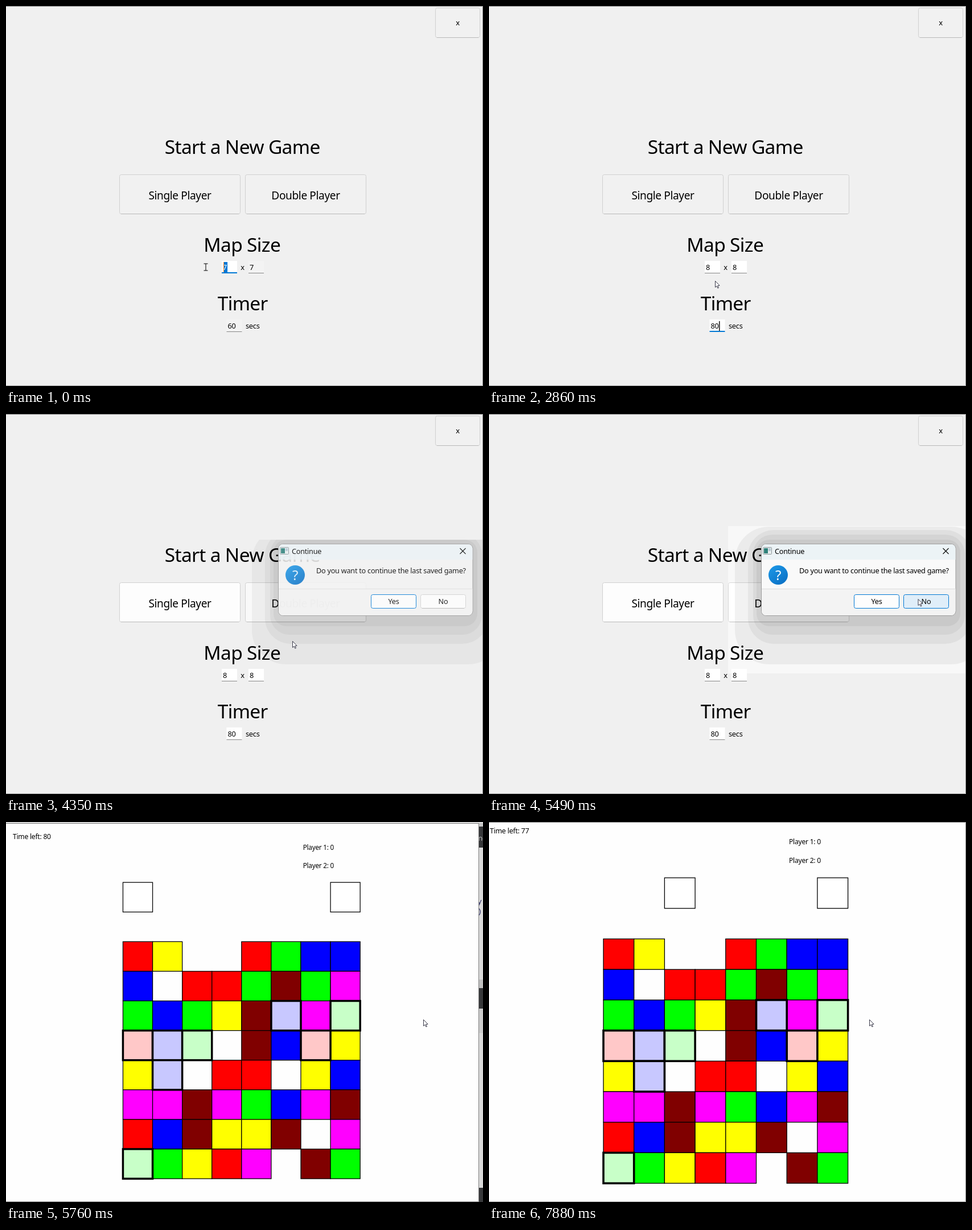
These frames come from a looping animation (838 px wide and 668 px high, 8000 ms). An HTML page with a canvas:

```html
<!DOCTYPE html>
<html lang="en">
<head>
<meta charset="utf-8">
<title>Start a New Game</title>
<style>
  html, body { margin: 0; width: 100%; height: 100%; overflow: hidden; background: #f0f0f0; }
  canvas { display: block; }
</style>
</head>
<body>
<canvas id="stage" width="838" height="668"></canvas>
<script>
const g = document.getElementById('stage').getContext('2d');
const LOOP = 8000;
const SANS = '"Noto Sans", "Open Sans", sans-serif';
const MONO = '"Liberation Mono", "DejaVu Sans Mono", monospace';
const BLUE = '#0078d4';

// Step tables: [start time, ...values]; gives the values of the last row already begun.
const at = (table, t) => table.filter(row => row[0] <= t).pop().slice(1);

const I = 1, ARROW = 0;
const POINTER = [
  [0, 351, 459, I], [290, 350, 458, ARROW], [420, 362, 463, ARROW], [560, 392, 466, I],
  [690, 425, 466, I], [830, 446, 464, I], [970, 449, 462, I], [1110, 446, 460, I],
  [1260, 430, 459, I], [1390, 415, 459, I], [1650, 410, 505, ARROW], [1780, 409, 558, I],
  [1910, 406, 564, I], [2030, 385, 566, I], [2150, 360, 568, I], [2280, 343, 569, I],
  [2580, 346, 558, ARROW], [2720, 372, 524, ARROW], [2860, 397, 483, ARROW],
  [3000, 398, 425, ARROW], [3140, 388, 356, ARROW], [3280, 402, 342, ARROW],
  [3420, 432, 337, ARROW], [3560, 468, 338, ARROW], [3830, 474, 348, ARROW],
  [3960, 490, 375, ARROW], [4110, 503, 399, ARROW], [4490, 525, 402, ARROW],
  [4620, 560, 398, ARROW], [4770, 610, 385, ARROW], [4920, 665, 365, ARROW],
  [5070, 715, 343, ARROW], [5190, 745, 329, ARROW], [5340, 753.5, 325, ARROW],
  [5760, 733, 347, ARROW], [5910, 710, 380, ARROW], [6040, 688, 401, ARROW],
  [6320, 681, 401, ARROW], [6590, 678, 380, ARROW], [6730, 672, 356, ARROW],
  [6900, 668, 347, ARROW]
];

const PLAIN = 0, WHITE = 1, CARET = 2, SELECTED = 3;
const COLS = [[0, '7', SELECTED], [150, '8', CARET], [1110, '8', WHITE]];
const ROWS = [[0, '7', PLAIN], [1110, '7', CARET], [1260, '7', SELECTED], [1520, '8', CARET], [1910, '8', WHITE]];
const SECS = [[0, '60', PLAIN], [1910, '60', CARET], [2030, '60', SELECTED],
  [2580, '8', CARET], [2720, '80', CARET], [3680, '80', WHITE]];

const GREY = '#d0d0d0';
const SINGLE = [[0, '#f1f1f1', GREY], [3140, '#e0eef9', BLUE], [3420, '#fdfdfd', GREY], [5610, '#f1f1f1', GREY]];
const DOUBLE = [[0, '#f1f1f1', GREY], [3420, '#e0eef9', BLUE], [3680, '#d5e8f6', BLUE],
  [4240, '#f9f9f9', GREY], [5610, '#f1f1f1', GREY]];

function rect(x, y, w, h, fill) {
  g.fillStyle = fill;
  g.fillRect(x, y, w, h);
}

function box(x, y, w, h, r, fill, stroke) {
  g.beginPath();
  g.roundRect(x, y, w, h, r);
  if (fill) { g.fillStyle = fill; g.fill(); }
  if (stroke) { g.strokeStyle = stroke; g.lineWidth = 1; g.stroke(); }
}

function line(points, color, width = 1) {
  g.beginPath();
  points.forEach(([x, y]) => g.lineTo(x, y));
  g.strokeStyle = color;
  g.lineWidth = width;
  g.stroke();
}

// y is the middle of the capitals
function text(s, x, y, size, { align = 'left', color = '#000', font = SANS, weight = 400 } = {}) {
  g.font = `${weight} ${size}px ${font}`;
  g.letterSpacing = font === SANS ? `${-0.02 * size}px` : '0px';
  g.textAlign = align;
  g.fillStyle = color;
  g.fillText(s, x, y + 0.36 * size);
}

function button(x, y, w, h, label, size, [fill, stroke]) {
  box(x + .5, y + .5, w - 1, h - 1, 3, fill, stroke);
  if (stroke === GREY) line([[x + 3, y + h - .5], [x + w - 3, y + h - .5]], '#b9b9b9');
  text(label, x + w / 2, y + h / 2 + (size > 15 ? 2 : 0), size, { align: 'center' });
}

function field(x, y, [value, state]) {
  const focus = state >= CARET;
  rect(x, y, 27, 22, state === PLAIN ? '#f3f3f3' : '#fff');
  rect(x, y + (focus ? 20 : 21), 27, focus ? 2 : 1, focus ? BLUE : '#868686');
  text(value, x + 2, y + 11.5, 12.8);
  const w = g.measureText(value).width;
  if (state === SELECTED) {
    rect(x + 3, y + 2, w, 18, '#0078d7');
    text(value, x + 2, y + 11.5, 12.8, { color: '#fff' });
    rect(x + 3, y + 2, 1, 18, '#ff8728');
  }
  if (state === CARET) rect(x + 2.5 + w, y + 3, 1.4, 17, '#000');
}

function frame() {
  rect(0, 0, 838, 1, '#7a7a7a');
  rect(837, 0, 1, 668, '#8a8a8a');
  rect(0, 667, 838, 1, '#a0a0a0');
}

function menu(t) {
  rect(-10, -10, 860, 690, '#f0f0f0');
  button(754, 3, 79, 53, 'x', 13, ['#f1f1f1', GREY]);
  const mid = { align: 'center' };
  text('Start a New Game', 415.2, 247.5, 33.5, mid);
  button(199, 296, 213, 70, 'Single Player', 19.1, at(SINGLE, t));
  button(420, 296, 213, 70, 'Double Player', 19.1, at(DOUBLE, t));
  text('Map Size', 414.7, 420, 33.5, mid);
  field(379, 448, at(COLS, t));
  text('x', 415.5, 459.5, 12.8, mid);
  field(426, 448, at(ROWS, t));
  text('Timer', 415.7, 523, 33.5, mid);
  field(387.5, 551, at(SECS, t));
  text('secs', 421, 562.5, 12.8);
}

function shadow(strength) {
  const rings = [[432, 198, 440, 242, 60], [455, 204, 392, 200, 45], [464, 212, 372, 176, 34], [470, 221, 358, 152, 22]];
  rings.forEach(([x, y, w, h, r]) => box(x, y, w, h, r, `rgba(0,0,0,${0.05 * strength})`));
}

function dialog(t) {
  const closing = t >= 5610;
  box(478.5, 228.5, 341.5, 126, 8, '#f9f9f9', '#9c9c9c');
  box(479, 229, 340.5, 27, [8, 8, 0, 0], '#ecf3f6');
  box(479, 307, 340.5, 47, [0, 0, 8, 8], '#f3f3f3');
  rect(479, 307, 340.5, 1, '#dedede');
  box(481.5, 234.5, 15, 12, 1, '#e8eeee', '#8a9498');
  rect(483, 236, 7, 9, '#2d8079');
  rect(491, 236, 4, 5, '#b9cbd8');
  text('Continue', 502, 241, 12.7);
  line([[797.5, 236], [807.5, 246]], '#111', 1.2);
  line([[807.5, 236], [797.5, 246]], '#111', 1.2);
  const blue = g.createLinearGradient(495, 267, 520, 300);
  blue.addColorStop(0, '#1c97e6');
  blue.addColorStop(1, '#0a6fc4');
  g.beginPath();
  g.arc(508, 283, 17, 0, 7);
  g.fillStyle = blue;
  g.fill();
  text('?', 508, 283.5, 24, { align: 'center', color: '#fff', weight: 500 });
  text('Do you want to continue the last saved game?', 545, 275, 12.7);
  const over = t >= 5190;
  button(641, 317, 80, 25, 'Yes', 12.7, ['#fdfdfd', closing ? GREY : BLUE]);
  button(728, 317, 80, 25, 'No', 12.7, closing ? ['#d3e8f8', BLUE] : over ? ['#e0eef9', BLUE] : ['#fdfdfd', GREY]);
}

const CODE = [
  'void QFlagScene::keyPressEvent(QKeyEvent *event) {',
  '    if (event->key() == Qt::Key_P) {',
  '        emit pauseGame();',
  '    } else if (event->key() == Qt::Key_O) {',
  '        emit saveGame();',
  '    } else if (event->key() == Qt::Key_Left || event->key()',
  '               event->key() == Qt::Key_Up || event->key()',
  '        emit movePlayer1(event->key());',
  '    } else if (event->key() == Qt::Key_W || event->key()',
  '        emit movePlayer2(event->key());',
  '    }else if (event->key() == Qt::Key_Q) {',
  '        emit quitGame();',
  '    }',
  '}'
];
const TREE = ['Map.h', 'Player.h', 'PlayerSignals.h', 'QFlagScene.h', 'SaveManager.h', '+Sources', 'Game.cpp',
  'GameMenu.cpp', 'Grid.cpp', 'main.cpp', 'Map.cpp', 'Player.cpp', 'QFlagScene.cpp', 'SaveManager.cpp', '+Forms'];
const OPEN = ['GameMenu.cpp', 'main.cpp', 'Map.cpp', 'Player.cpp', 'QFlagScene.cpp', 'SaveManager.cpp'];
const BUILD = 'D:\\edu\\SJTU\\3-1\\SEP\\qlink\\build-qflags-';
const OUTPUT = [
  [390, '22:06:55: Starting ' + BUILD], [409, '22:06:58: ' + BUILD + 'Desktop_Qt'],
  [465, '22:08:12: Starting ' + BUILD], [483, '22:08:17: ' + BUILD + 'Desktop_Qt'], [502, 'code 0'],
  [539, '22:09:02: Starting ' + BUILD], [557, '22:09:07: ' + BUILD + 'Desktop_Qt'], [576, 'code 0'],
  [613, '22:09:35: Starting ' + BUILD]
];
const MODES = ['Welcome', 'Edit', 'Design', 'Debug', 'Projects', 'Help'];

function fileRow(name, x, y) {
  box(x - 27.5, y - 8.5, 12, 17, 1, '#fff', '#666');
  text(name.endsWith('.h') ? 'h' : 'c+', x - 22, y + 2, 9, { align: 'center' });
  text(name, x, y, 12.6);
}

function sidebar() {
  const pale = { align: 'center', color: '#fff', weight: 700 };
  MODES.forEach((name, i) => text(name, 28, 89 + i * 55.8, 11.5, pale));
  for (let i = 0; i < 9; i++) rect(18 + i % 3 * 7, 57 + (i / 3 | 0) * 7, 6, 6, '#ddd');
  rect(18, 113, 20, 20, '#ddd');
  rect(21, 117, 14, 10, '#4a9fe0');
  line([[20, 188], [36, 171]], '#ddd', 5);
  g.fillStyle = '#ddd';
  g.beginPath(); g.ellipse(28, 236, 7, 9, 0, 0, 7); g.fill();
  for (const y of [230, 236, 242]) line([[18, y], [38, y]], '#ddd', 2);
  line([[19, 300], [32, 287]], '#ddd', 5);
  g.beginPath(); g.arc(34, 285, 5, 0, 7); g.stroke();
  g.beginPath(); g.arc(28, 347, 11, 0, 7); g.fill();
  text('?', 28, 347, 16, { align: 'center', color: '#404244', weight: 700 });
  text('qflags', 28, 399, 12, { align: 'center', color: '#fff' });
  rect(11, 420, 35, 25, '#ddd');
  rect(21, 448, 15, 4, '#ddd');
  text('Debug', 28, 474, 11.5, pale);
  for (const y of [530, 587]) {
    g.fillStyle = '#c8f0c8';
    g.beginPath(); g.moveTo(16, y - 15); g.lineTo(42, y); g.lineTo(16, y + 15); g.fill();
  }
  line([[16, 652], [36, 632]], '#e8d8a0', 5);
  line([[26, 626], [44, 636]], '#e8d8a0', 8);
  for (const y of [237, 443]) line([[59, y - 4], [63, y], [59, y + 4]], '#ddd', 2);
}

function ide() {
  const pale = { color: '#ddd' };
  rect(0, 0, 838, 668, '#404244');
  rect(0, 0, 838, 8, '#e8e8e8');
  rect(80, 45, 257, 386, '#fff');
  rect(80, 467, 257, 176, '#fff');
  rect(338, 45, 500, 247, '#fff');
  rect(338, 328, 500, 315, '#fff');
  rect(323, 45, 14, 386, '#e0e0e0');
  rect(323, 58, 14, 103, '#aaa');
  rect(323, 467, 14, 176, '#e0e0e0');
  rect(338, 277, 500, 15, '#e0e0e0');
  rect(123, 647, 289, 21, '#fff');
  sidebar();

  text('Projects', 87, 28, 12.6, pale);
  text('Open Documents', 87, 450, 12.6, pale);
  for (const [x, y] of [[186, 28], [255, 450], [693, 28]]) {
    line([[x - 4, y - 2], [x, y - 6], [x + 4, y - 2]], '#ddd', 1.5);
    line([[x - 4, y + 2], [x, y + 6], [x + 4, y + 2]], '#ddd', 1.5);
  }
  for (const [x, y] of [[285, 28], [320, 28], [285, 450], [320, 450], [522, 312]])
    box(x - 7.5, y - 5.5, 15, 11, 1, null, '#ddd');
  line([[208, 22], [222, 22], [215, 29], [215, 35]], '#ddd', 2);
  box(241.5, 24.5, 18, 7, 4, null, '#ddd');
  line([[359, 20], [351, 28], [359, 36]], '#e0a040', 2);
  line([[386, 20], [394, 28], [386, 36]], '#ddd', 2);
  box(417.5, 26.5, 12, 8, 1, null, '#ddd');
  box(451.5, 18.5, 13, 18, 1, '#fff', '#666');
  text('QFlagScene.cpp', 482, 28, 12.6, pale);
  line([[716, 22], [728, 34]], '#ddd', 1.5);
  line([[728, 22], [716, 34]], '#ddd', 1.5);
  box(755, 20, 14, 14, 3, '#e8c890');
  text('QFlagScene', 777, 28, 12.6, pale);

  TREE.forEach((name, i) => {
    const y = 58 + i * 25.75;
    if (name[0] !== '+') return fileRow(name, 159, y);
    box(115, y - 6, 18, 12, 1, '#d8b060');
    line([[98, y - 2], [102, y + 2], [106, y - 2]], '#777');
    text(name.slice(1), 144, y, 12.6);
  });
  OPEN.forEach((name, i) => fileRow(name, 116, 480 + i * 25.75));

  CODE.forEach((s, i) => {
    const y = 53 + i * 17.2;
    text(9 + i, 371, y, 12.7, { align: 'right', font: MONO, color: '#777' });
    text(s, 402, y, 12.7, { font: MONO, color: '#20206a' });
    if (/[{]$/.test(s)) line([[382, y - 2], [385, y + 1], [388, y - 2]], '#777');
  });
  box(670.5, 95.5, 40, 17, 4, null, '#555');
  text('Application Output', 345, 312, 12.6, pale);
  line([[548, 315], [554, 309], [560, 315]], '#ddd', 2);
  line([[582, 309], [588, 315], [594, 309]], '#ddd', 2);
  rect(338, 328, 500, 43, '#eee');
  text('qflags', 350, 346, 12.6);
  rect(391, 337, 18, 18, '#e8c890');
  OUTPUT.forEach(([y, s]) => text(s, 344, y, 13.5, { font: MONO, weight: 700, color: '#3a3a5a' }));

  text('Type to locate (Ctrl+K)', 162, 664, 12.6, { color: '#777' });
  ['1', '2   Search', '3   Application', '4   Compile', '5   T'].forEach((s, i) =>
    text(s, [432, 498, 590, 707, 806][i], 664, 12.6, pale));
  box(92.5, 654.5, 14, 13, 1, null, '#ddd');
  g.beginPath(); g.arc(463, 663, 10, 0, 7); g.fillStyle = '#ddd'; g.fill();
}

const COLORS = {
  R: '#f00', Y: '#ff0', G: '#0f0', B: '#00f', M: '#f0f', D: '#800000',
  r: '#ffc8c8', g: '#c8ffc8', b: '#c8c8ff'
};
const BOARD = ['RY..RGBB', 'B.RRGDGM', 'GBGYDbMg', 'rbg.DBrY', 'Yb.RR.YB', 'MMDMGBMD', 'RBDYYD.M', 'gGYRM.DG'];
const CELL = 53.7;

function cell(col, row, fill, width) {
  const x = 201 + col * CELL, y = 205.5 + row * CELL;
  rect(x, y, CELL, CELL, fill);
  g.strokeStyle = '#000';
  g.lineWidth = width;
  g.strokeRect(x, y, CELL, CELL);
}

function game(t) {
  const [left] = at([[0, 80], [6040, 79], [6730, 78], [7880, 77]], t);
  const [col] = at([[0, 0], [7580, 1], [7880, 2]], t);
  text('Time left: ' + left, 1.5, 15, 12.5);
  text('Player 1: 0', 527, 35, 12.1);
  text('Player 2: 0', 527, 67.5, 12.1);
  cell(col, -2, '#fff', 1.3);
  cell(7, -2, '#fff', 1.3);
  for (const framed of [false, true])
    BOARD.forEach((row, r) => [...row].forEach((c, i) => {
      if (c !== '.' && (c > 'Z') === framed) cell(i, r, COLORS[c], framed ? 3.6 : 1.3);
    }));
}

function pointer(t) {
  const [x, y, kind] = at(POINTER, t);
  g.save();
  g.translate(x, y);
  if (kind === I) {
    line([[-3.5, -6], [3.5, -6]], '#222', 1.2);
    line([[0, -6], [0, 6]], '#222', 1.2);
    line([[-3.5, 6], [3.5, 6]], '#222', 1.2);
  } else {
    g.translate(.5, .5);
    g.beginPath();
    [[0, 0], [0, 11], [2.6, 8.8], [4.4, 12.6], [6, 11.9], [4.3, 8.2], [7.6, 7.8]].forEach(p => g.lineTo(...p));
    g.closePath();
    g.fillStyle = '#fff';
    g.fill();
    g.strokeStyle = '#3a3a4a';
    g.lineWidth = 1;
    g.stroke();
  }
  g.restore();
}

function menuScene(t) {
  menu(t);
  if (t >= 4240) {
    const settled = t >= 4770;
    g.save();
    g.beginPath();
    if (settled) g.rect(420, 197, 418, 259);
    else g.rect(380, 221, 458, 352);
    g.clip();
    if (settled) {
      // brightens the ground but leaves black text alone
      g.globalCompositeOperation = 'color-dodge';
      rect(420, 197, 418, 259, '#080808');
      g.globalCompositeOperation = 'source-over';
    }
    g.globalAlpha = t < 4370 ? 0.85 : 1;
    shadow(1);
    dialog(t);
    g.restore();
  }
  frame();
}

function fadeScene(t) {
  ide();
  g.save();
  g.globalAlpha = 0.88;
  g.translate(416, 300);
  g.scale(.995, .995);
  g.translate(-416, -300);
  menu(t);
  shadow(.6);
  dialog(t);
  g.restore();
  frame();
}

function gameScene(t) {
  g.save();
  if (t < 5910) {
    ide();
    rect(828, 0, 10, 668, 'rgba(0,0,0,.15)');
    rect(0, 0, 838, 2, '#ddd');
    rect(0, 2, 831, 666, '#808080');
    rect(0, 3, 830, 664, '#fefefe');
    g.translate(10.5, 11);
    g.scale(.97, .97);
  } else {
    rect(0, 0, 838, 668, '#fefefe');
    frame();
  }
  game(t);
  g.restore();
}

function draw(now) {
  const t = now % LOOP;
  (t < 5610 ? menuScene : t < 5760 ? fadeScene : gameScene)(t);
  pointer(t);
}

const start = performance.now();
function tick() {
  draw(performance.now() - start);
  requestAnimationFrame(tick);
}
tick();
</script>
</body>
</html>
```
